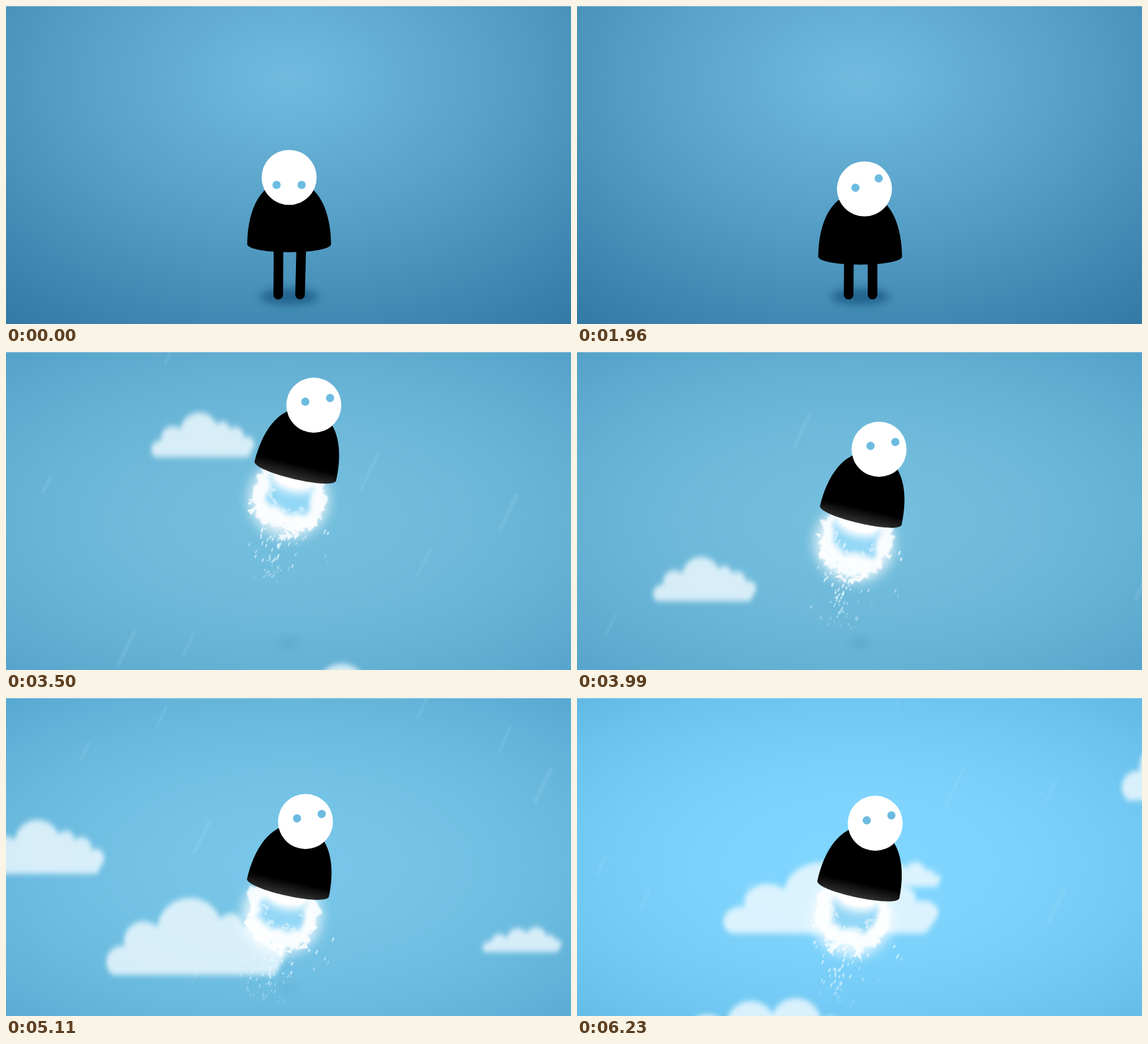
An HTML page that plays this animation: 910 by 512 pixels, repeating every 6300 ms.

```html
<!DOCTYPE html>
<html lang="en">
<head>
<meta charset="utf-8">
<title>Lift-off</title>
<style>
html, body { margin: 0; width: 100%; height: 100%; overflow: hidden; background: #6fbade; }
svg { display: block; width: 910px; height: 512px; }
</style>
</head>
<body>
<svg viewBox="0 0 910 512" xmlns="http://www.w3.org/2000/svg">
  <defs>
    <radialGradient id="sky" gradientUnits="userSpaceOnUse" cx="0" cy="0" r="1"></radialGradient>
    <linearGradient id="coat" gradientUnits="userSpaceOnUse" x1="0" y1="-12" x2="0" y2="13">
      <stop offset="0" stop-color="#000"/>
      <stop id="hem" offset="1" stop-color="#000"/>
    </linearGradient>
    <filter id="soft" x="-50%" y="-50%" width="200%" height="200%"><feGaussianBlur stdDeviation="1.3"/></filter>
    <filter id="mist" x="-30%" y="-40%" width="160%" height="180%"><feGaussianBlur stdDeviation="3.5 5"/></filter>
    <filter id="blur" x="-60%" y="-100%" width="220%" height="300%"><feGaussianBlur stdDeviation="7"/></filter>
    <filter id="halo" x="-60%" y="-60%" width="220%" height="220%"><feGaussianBlur stdDeviation="10"/></filter>
  </defs>
  <rect width="910" height="512" fill="url(#sky)"/>
  <rect width="910" height="1" fill="#fff" opacity=".35"/>
  <ellipse id="shadow" cx="456" cy="468" fill="#17547f" filter="url(#blur)"/>
  <g id="streaks" stroke="#c4e9f6" stroke-linecap="round" filter="url(#soft)"></g>
  <g id="clouds" fill="#f2fbff"></g>
  <g id="hero">
    <g id="flame">
      <ellipse cy="46" rx="64" ry="62" fill="#fff" opacity=".8" filter="url(#halo)"/>
      <path id="burst" fill="#fff" opacity=".85" filter="url(#soft)"/>
      <path id="shards" fill="#fff" opacity=".8"/>
      <path id="core" fill="#79cdf4" opacity=".8" filter="url(#mist)"/>
      <path id="rays" fill="#e2f6fe" opacity=".6"/>
      <ellipse cy="14" rx="38" ry="20" fill="#fff" filter="url(#blur)"/>
      <ellipse cy="11" rx="32" ry="15" fill="#fff" filter="url(#soft)"/>
      <g id="sparks" stroke="#e6f8ff" stroke-linecap="round"></g>
    </g>
    <g id="legs" stroke="#000" stroke-width="15.5" stroke-linecap="round"><line/><line/></g>
    <path d="M-67.5 0C-67 -56 -46 -103 0 -103S67 -56 67.5 0C62 16.5 -62 16.5 -67.5 0Z" fill="url(#coat)"/>
  </g>
  <g id="head">
    <circle r="44.3" fill="#fff"/>
    <g id="eyes" fill="#6cbbe0"><circle cx="-20.2" r="6.6"/><circle cx="20.2" r="6.6"/></g>
  </g>
</svg>
<script>
const LOOP = 6300, STEP = 70, LIFT = 2030, TOP = 2520, SETTLED = 4560;
const SLANT = .48; // sideways drift per pixel of fall
const $ = id => document.getElementById(id);
const set = (el, attrs) => { for (const k in attrs) el.setAttribute(k, attrs[k]); };
const add = (parent, tag, attrs = {}) => {
  const el = document.createElementNS('http://www.w3.org/2000/svg', tag);
  set(el, attrs);
  return parent.appendChild(el);
};
const make = (n, fn) => Array.from({ length: n }, (_, i) => fn(i));
const lerp = (a, b, p) => a + (b - a) * p;
const ramp = (t, a, b) => Math.min(1, Math.max(0, (t - a) / (b - a)));
const smooth = p => p * p * (3 - 2 * p);
const easeOut = (p, power) => 1 - Math.pow(1 - p, power);
const fract = v => v - Math.floor(v);
const rnd = n => fract(Math.sin(n * 127.1 + 11.7) * 43758.5453);

// Sky: each state fades from an inner to an outer colour along a power curve
const sky = (inner, outer, power) => r => {
  const part = (hex, i) => parseInt(hex.substr(1 + 2 * i, 2), 16);
  return make(3, i => lerp(part(inner, i), part(outer, i), Math.pow(r, power)));
};
const ground = sky('#6fbade', '#3077a2', 1.15);
const air = sky('#74bfde', '#4c9bc4', 1.9);
const high = sky('#80d6ff', '#5ab2dd', 2);
const stops = make(9, i => add($('sky'), 'stop', { offset: i / 8 }));

function drawSky(t) {
  const up = smooth(ramp(t, 2060, 2620)), glow = Math.pow(ramp(t, 4300, 6230), 1.35);
  stops.forEach((stop, i) => {
    const r = i / 8, a = ground(r), b = air(r), c = high(r);
    const rgb = a.map((v, k) => Math.round(lerp(lerp(v, b[k], up), c[k], glow)));
    set(stop, { 'stop-color': `rgb(${rgb})` });
  });
  set($('sky'), { gradientTransform: `translate(455 ${lerp(115, 270, up)}) scale(760 ${lerp(520, 400, up)})` });
  const gone = smooth(ramp(t, LIFT, 2350));
  set($('shadow'), {
    rx: lerp(47, 17, gone), ry: lerp(13, 8, gone),
    opacity: lerp(.75, .12, gone) * (1 - ramp(t, 4700, 5600))
  });
}

// Clouds: round bumps between the joints of an outline 100 wide
function outline(joints) {
  const end = joints[joints.length - 1];
  return joints.slice(1).reduce((d, [x, y], i) => {
    const r = Math.hypot(x - joints[i][0], y - joints[i][1]) * .515;
    return `${d}A${r} ${r} 0 0 1 ${x} ${y}`;
  }, `M${joints[0]}`) + `L${end[0] - 5} 0Z`;
}
const peak = outline([[0, 0], [7, -17], [26, -28], [63, -33], [76, -28], [90, -20], [100, -9]]);
const twin = outline([[0, 0], [9, -13], [30, -17], [55, -24], [81, -20], [92, -15], [100, -8]]);

// shape, a time, left end and base line at that time, width; wider ones are nearer and faster
const clouds = [
  [peak, 3500, 240, 169, 158], [peak, 3500, 446, 597, 210],
  [twin, 4550, -98, 441, 372], [peak, 4550, 870, 201, 280],
  [peak, 5110, -36, 283, 192], [peak, 5110, 172, 446, 275], [twin, 5110, 770, 409, 124],
  [twin, 6230, 462, 304, 123], [peak, 6230, 248, 379, 330],
  [twin, 6230, 150, 580, 300], [peak, 6230, 888, 165, 280]
].map(([d, at, x, y, w]) => {
  const el = add($('clouds'), 'g', { filter: 'url(#mist)', opacity: .8 });
  add(el, 'path', { d, transform: `scale(${w / 100} ${w === 330 ? w / 130 : w / 100})` });
  return { el, at, x, y, w };
});
const streaks = make(8, i => ({
  el: add($('streaks'), 'line', { 'stroke-width': 4 + 4 * rnd(i + 60) }),
  x: 60 + 1080 * fract(i * .618 + .1), len: 22 + 40 * rnd(i + 20),
  life: 750 + 500 * rnd(i + 40), seed: rnd(i + 80)
}));

function drawAir(t) {
  for (const c of clouds) {
    const fall = 3 * c.w * (t - c.at) / 1000, y = c.y + fall;
    const seen = t > TOP && y > -20 && y - c.w / 2 < 530;
    set(c.el, { transform: `translate(${c.x - fall * SLANT} ${y})`, display: seen ? 'inline' : 'none' });
  }
  const show = ramp(t, 2600, 3000) * .12;
  for (const s of streaks) {
    const y = -90 + 700 * fract(t / s.life + s.seed), x = s.x - y * SLANT;
    set(s.el, { x1: x, y1: y, x2: x - s.len * SLANT, y2: y + s.len, opacity: show });
  }
}

// Flame: jagged rings and chips, reseeded at every step
const poly = pts => 'M' + pts.map(p => p.map(v => v.toFixed(1)).join(' ')).join('L') + 'Z';
const square = v => Math.sign(v) * Math.pow(Math.abs(v), .66);

function ring(n, cy, rx, ry, rough, flare, seed) {
  return poly(make(n, i => {
    const a = (i + .6 * rnd(seed + i)) / n * 2 * Math.PI;
    const k = 1 + rough * (rnd(seed + i + 99) - .5);
    const x = square(Math.cos(a)), y = square(Math.sin(a));
    return [x * rx * k * (1 - flare * y), cy + y * ry * k];
  }));
}
function chips(n, cy, radius, size, seed) {
  return make(n, i => {
    const a = Math.PI * rnd(seed + i), r = radius * lerp(.85, 1.12, rnd(seed + i + 31));
    const x = Math.cos(a) * r, y = cy + Math.sin(a) * r;
    const turn = 6.28 * rnd(seed + i + 57), s = size * lerp(.4, 1, rnd(seed + i + 73));
    return poly([0, 2.4, 3.6].map(b => [x + s * Math.cos(turn + b), y + s * Math.sin(turn + b)]));
  }).join('');
}
const sparks = make(80, i => {
  const stray = i % 9 === 0;
  return {
    el: add($('sparks'), 'line', { 'stroke-width': 1.2 + 2.2 * rnd(i + 300) }),
    x: (rnd(i + 400) + rnd(i + 450) - 1) * (stray ? 115 : 58),
    y: stray ? 40 : 84, life: 420 + 380 * rnd(i + 500), seed: rnd(i + 600)
  };
});

function drawFlame(t) {
  const power = smooth(ramp(t, LIFT, 2170)), seed = Math.round(t / STEP) * 17;
  const grey = Math.round(52 * power);
  set($('flame'), { transform: `scale(${lerp(.6, 1, power)} ${power})`, display: power ? 'inline' : 'none' });
  set($('hem'), { 'stop-color': `rgb(${grey},${grey},${grey})` });
  set($('burst'), { d: ring(48, 46, 56, 49, .24, .12, seed) });
  set($('shards'), { d: chips(16, 45, 56, 11, seed + 200) });
  set($('core'), { d: ring(30, 36, 37, 29, .4, 0, seed + 400) });
  set($('rays'), { d: chips(14, 34, 32, 7, seed + 600) });
  for (const s of sparks) {
    const age = fract(t / s.life + s.seed), y = s.y + 105 * age, x = s.x * (1 - .2 * age);
    const len = 1 + 4 * s.seed;
    set(s.el, { x1: x, y1: y, x2: x - len * .2, y2: y + len, opacity: (.8 * (1 - age * age)).toFixed(2) });
  }
}

function drawHero(t) {
  const crouch = smooth(ramp(t, 210, 1600));
  const launch = smooth(Math.pow(ramp(t, LIFT, TOP), .6));
  const settle = ramp(t, TOP, SETTLED), drift = ramp(t, SETTLED, 6230), sway = ramp(t, 3500, 6230);

  const x = 456 + 53 * launch - 54.5 * easeOut(settle, 2.4) - 1.5 * drift;
  const y = 384 + 20 * crouch - 310.5 * launch + 210 * smooth(settle) + 5.5 * easeOut(drift, 1.5);
  const turn = 13.3 * launch - 1.4 * sway;
  set($('hero'), { transform: `translate(${x} ${y}) rotate(${turn})` });

  const a = turn * Math.PI / 180, cos = Math.cos(a), sin = Math.sin(a);
  const hx = 7 * crouch - 2.4 * launch, hy = -108 - 1.5 * crouch - 1.2 * launch;
  set($('head'), { transform: `translate(${x + hx * cos - hy * sin} ${y + hx * sin + hy * cos})` });
  const ex = 4.2 * crouch + 2 * launch, ey = 12 - 21.5 * crouch + .9 * launch;
  const look = -21.8 * crouch + 13.4 * launch - 2.9 * sway;
  set($('eyes'), { transform: `translate(${ex} ${ey}) rotate(${look})` });

  const tuck = smooth(ramp(t, LIFT, 2200));
  const foot = lerp(Math.min(80.7, 464.7 - y), -14, tuck);
  const [left, right] = $('legs').children;
  set(left, { x1: -17 - crouch, y1: -14, x2: -17.5 - crouch, y2: foot });
  set(right, { x1: 20, y1: -14, x2: 17.6 + 2.4 * crouch, y2: foot });
}

function draw(now) {
  const t = Math.floor(now % LOOP / STEP) * STEP;
  drawSky(t);
  drawAir(t);
  drawFlame(t);
  drawHero(t);
}
const start = performance.now();
function tick() {
  draw(performance.now() - start);
  requestAnimationFrame(tick);
}
tick();
</script>
</body>
</html>
```
